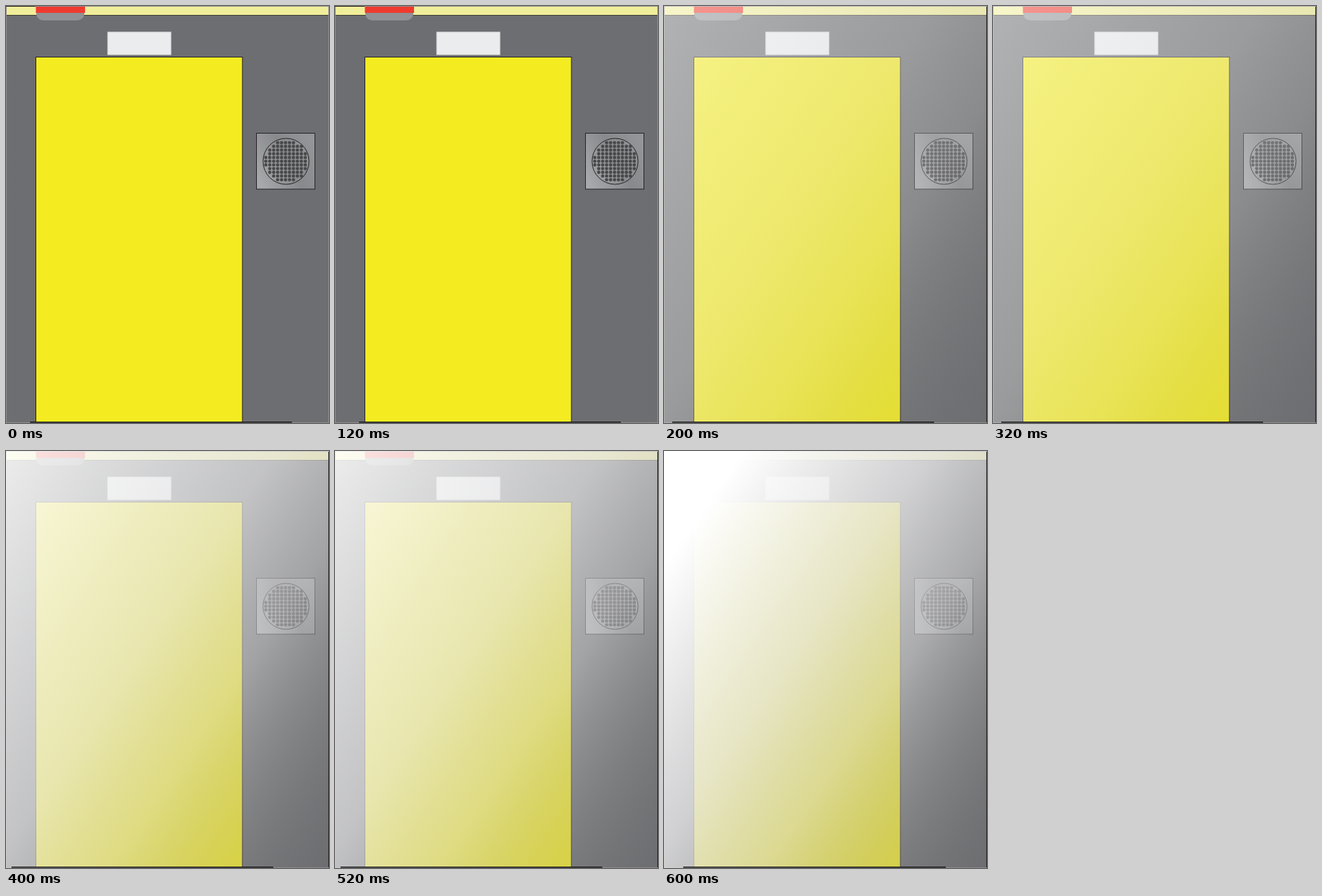
Write an HTML page with a canvas that moves like this. It is 470 px wide and 608 px high and loops after 0.8 s.

```html
<!DOCTYPE html>
<html lang="en">
<head>
<meta charset="utf-8">
<title>Door</title>
<style>
html, body { margin: 0; width: 100%; height: 100%; overflow: hidden; background: #fff; }
canvas { display: block; }
</style>
</head>
<body>
<canvas id="stage" width="470" height="608"></canvas>
<script>
const ctx = document.getElementById('stage').getContext('2d');
const W = 470, H = 608, STEP = 200;

// Glare strength, where it starts fading, and the bottom line's left and right ends
const phases = [
  { glare: 0, from: 0, line: [35, 416] },
  { glare: 0.47, from: 0, line: [12, 393] },
  { glare: 0.87, from: 0, line: [8, 389] },
  { glare: 1, from: 95, line: [28, 410] }
];
// Distance along the glare axis, grey level, opacity
const fade = [[326, 228, 0.83], [466, 206, 0.64], [621, 152, 0.35], [730, 109, 0.18]];
const AXIS = 730;

function box(x, y, w, h, fill, stroke) {
  ctx.fillStyle = fill;
  ctx.fillRect(x, y, w, h);
  if (stroke) {
    ctx.strokeStyle = stroke;
    ctx.strokeRect(x, y, w, h);
  }
}

function disc(x, y, r) {
  ctx.beginPath();
  ctx.arc(x, y, r, 0, Math.PI * 2);
}

function speaker() {
  const metal = ctx.createLinearGradient(364, 250, 449, 205);
  metal.addColorStop(0, '#a7a9ac');
  metal.addColorStop(0.55, '#88898c');
  metal.addColorStop(1, '#939598');
  box(364.5, 185.5, 85, 81.5, metal, '#231f20');
  disc(407.5, 226.5, 33.5);
  ctx.stroke();
  ctx.fillStyle = '#48484a';
  for (let row = -5; row <= 5; row++) {
    for (let col = -5; col <= 5; col++) {
      const x = 406.75 + col * 5.75, y = 226.3 + row * 5.4;
      if (Math.hypot(x - 407.5, y - 226.3) > 31.3) continue;
      disc(x, y, 2.4);
      ctx.fill();
    }
  }
}

function scene() {
  box(0, 0, W, H, '#6d6e71');
  box(0, 0, W, 13, '#f1ee9b');
  box(0, 13, W, 1, '#3b3a30');
  ctx.fillStyle = '#8f9194';
  ctx.beginPath();
  ctx.roundRect(44, 10, 70, 11, [0, 0, 10, 10]);
  ctx.fill();
  box(43.5, 1, 71.5, 9, '#ef3a2f');
  box(148, 38, 92, 33, '#ebecee', '#d5d6d8');
  box(43.5, 74.5, 300.5, 540, '#f4ec21', '#231f20');
  speaker();

  ctx.strokeStyle = '#231f20';
  ctx.strokeRect(0.5, 0.5, W - 1, H - 1);
  ctx.strokeStyle = '#fff';
  ctx.setLineDash([1, 1]);
  ctx.strokeRect(0.5, 0.5, W - 1, H - 1);
  ctx.setLineDash([]);
}

function glare({ glare, from }) {
  const light = ctx.createLinearGradient(0, 0, 0.828 * AXIS, 0.56 * AXIS);
  for (const [pos, grey, alpha] of [[from, 255, 1], ...fade]) {
    light.addColorStop(pos / AXIS, `rgba(${grey},${grey},${grey + (255 - grey) * 0.02},${alpha * glare})`);
  }
  box(0, 0, W, H, light);
}

function draw(now) {
  const index = Math.floor(now / STEP) % phases.length;
  const phase = phases[index];
  const [left, right] = phase.line;
  scene();
  if (phase.glare) {
    glare(phase);
    box(W - 1, 1, 1, H - 2, '#231f20');
  } else {
    box(0, 0, 43, 1, '#231f20');
  }
  box(left, H - 2, right - left, 1.5, '#111');
  requestAnimationFrame(draw);
}

draw(0);
</script>
</body>
</html>
```
